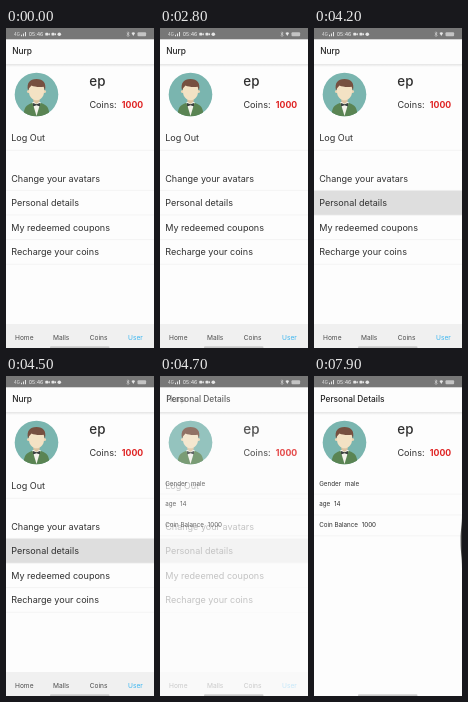
Animation of 148 by 320 pixels, one loop 8000 ms. Source, as an HTML page:

```html
<!DOCTYPE html>
<html lang="en">
<head>
<meta charset="utf-8">
<title>User page</title>
<style>
  html, body { margin: 0; width: 100%; height: 100%; overflow: hidden; background: #fdfdfd; }
  svg { display: block; width: 100%; height: 100%; }
  text { font-family: Inter, "Open Sans", sans-serif; fill: #303030; white-space: pre; }
  .title { font-size: 8.35px; font-weight: 500; fill: #242424; }
  .row { font-size: 9.05px; }
  .small { font-size: 6.25px; }
  .tab { font-size: 6.6px; fill: #4c4c4c; }
  .line { stroke: #ececec; stroke-width: .6; }
</style>
</head>
<body>
<svg viewBox="0 0 148 320" preserveAspectRatio="none">
  <defs>
    <clipPath id="disc"><circle cx="30.5" cy="66.5" r="21.8"/></clipPath>
    <linearGradient id="shade" x2="0" y2="1">
      <stop stop-color="#000" stop-opacity=".1"/>
      <stop offset="1" stop-color="#000" stop-opacity="0"/>
    </linearGradient>
    <g id="profile">
      <g clip-path="url(#disc)">
        <rect x="8" y="44" width="45" height="45" fill="#7ab5af"/>
        <path d="M17.5 90C17.5 79.5 20 77 26 75H35C41 77 43.5 79.5 43.5 90Z" fill="#5a8453"/>
        <path d="M26.3 74L30.5 88L34.7 74Z" fill="#f4f3ec"/>
        <path d="M27.3 68H33.7V73.5L30.5 76L27.3 73.5Z" fill="#dcc3a0"/>
        <path d="M27 75L30.5 76.3L34 75V78.6L30.5 77.3L27 78.6Z" fill="#3c4240"/>
        <circle cx="22.5" cy="63.5" r="1.5" fill="#ecd6b4"/>
        <circle cx="38.5" cy="63.5" r="1.5" fill="#ecd6b4"/>
        <path d="M23 57H38V64C38 69 34 72.3 30.5 72.3S23 69 23 64Z" fill="#f3e2c4"/>
        <path d="M22 62.5C20.5 55 23.5 51 30.5 51S40.5 55 39 62.5L37.6 58.8C34 59.5 28 59 25.5 57.6L23.3 60Z" fill="#765040"/>
      </g>
      <text x="83.3" y="57.5" font-size="13.4" font-weight="500">ep</text>
      <text x="83.4" y="80.3" font-size="9.15">Coins:</text>
      <text x="115.8" y="80.3" style="font-size:8.7px;font-weight:700;fill:#df2222">1000</text>
    </g>
  </defs>

  <rect width="148" height="320" fill="#fdfdfd"/>
  <rect id="press" y="162.5" width="148" height="24.7" fill="#dedede"/>
  <g id="menuRows"></g>
  <rect y="296" width="148" height="24" fill="#f0f0f0"/>
  <g id="tabs"></g>
  <use href="#profile"/>
  <text class="title" x="6.2" y="26.4">Nurp</text>

  <rect id="cover" y="11" width="148" height="309" fill="#fdfdfd"/>
  <g id="details">
    <g id="detailRows"></g>
    <use href="#profile"/>
    <text class="title" x="6.2" y="26.4">Personal Details</text>
  </g>

  <rect y="36" width="148" height="3" fill="url(#shade)"/>

  <rect width="148" height="11.3" fill="#777"/>
  <g fill="#e6e6e6">
    <text x="22.7" y="8.4" style="font-size:5.3px;fill:#f0f0f0">05:46</text>
    <text x="8" y="8" style="font-size:4.2px;fill:#e6e6e6">4G</text>
    <path d="M15 8.2V6.8H16V8.2ZM17 8.2V5.5H18V8.2ZM19 8.2V4H20V8.2Z"/>
    <rect x="39.3" y="4.8" width="3" height="2.8" rx=".7"/>
    <path d="M42 6.2L43.8 5V7.4Z"/>
    <rect x="45.5" y="4.8" width="3" height="2.8" rx=".7"/>
    <path d="M48.2 6.2L50 5V7.4Z"/>
    <circle cx="53.3" cy="6.2" r="1.8"/>
    <path d="M125.5 5Q127.3 3.5 129.1 5L127.3 8Z"/>
    <rect x="131.5" y="4.2" width="8.6" height="4" rx="1" fill="#c4c4c4"/>
  </g>
  <path d="M120.8 4.8L123.2 7.4L122 8.6V3.8L123.2 5L120.8 7.6" fill="none" stroke="#e6e6e6" stroke-width=".5"/>

  <rect x="44" y="318.5" width="59.5" height="1.3" rx=".65" fill="#bcbcbc"/>
  <path id="edge" fill="#444"/>
</svg>
<script>
  const $ = id => document.getElementById(id);
  const LOOP = 8000;
  const label = (cls, x, y, s) => `<text class="${cls}" x="${x}" y="${y}">${s}</text>`;
  const line = y => `<path class="line" d="M0 ${y}H148"/>`;

  const items = ['Change your avatars', 'Personal details', 'My redeemed coupons', 'Recharge your coins'];
  $('menuRows').innerHTML = label('row', 5.2, 113, 'Log Out') + line(122.3) +
    items.map((s, i) => label('row', 5.2, 153.6 + i * 24.5, s) + line(162.4 + i * 24.6)).join('');

  const facts = [['Gender', 'male', 31], ['age', '14', 20], ['Coin Balance', '1000', 47.7]];
  $('detailRows').innerHTML = facts.map(([key, value, x], i) => {
    const y = 109.5 + i * 20.9;
    return label('small', 5.2, y, key) + label('small', x, y, value) + line(y + 8.6);
  }).join('');

  $('tabs').innerHTML = [['Home', 9], ['Malls', 47], ['Coins', 83.7], ['User', 122]]
    .map(([s, x]) => label('tab', x, 311.7, s)).join('');
  $('tabs').lastElementChild.style.fill = '#3cb6f0';

  const ramp = (t, from, to) => Math.min(1, Math.max(0, (t - from) / (to - from)));

  function draw(ms) {
    const t = Math.floor(ms / 100) * 100; // the screen refreshes ten times a second
    $('press').setAttribute('opacity', ramp(t, 3900, 4200));
    const fade = 1 - (1 - ramp(t, 4600, 4860)) ** 2.6;
    $('cover').setAttribute('opacity', fade);
    $('details').setAttribute('opacity', fade);

    const pull = 1.4 * ramp(t, 7700, 7900);
    $('edge').setAttribute('d', pull
      ? `M148 138C148 150 ${148 - pull} 152 ${148 - pull} 165S148 180 148 192Z` : '');
  }

  const start = performance.now();
  function tick() {
    draw((performance.now() - start) % LOOP);
    requestAnimationFrame(tick);
  }
  tick();
</script>
</body>
</html>
```
